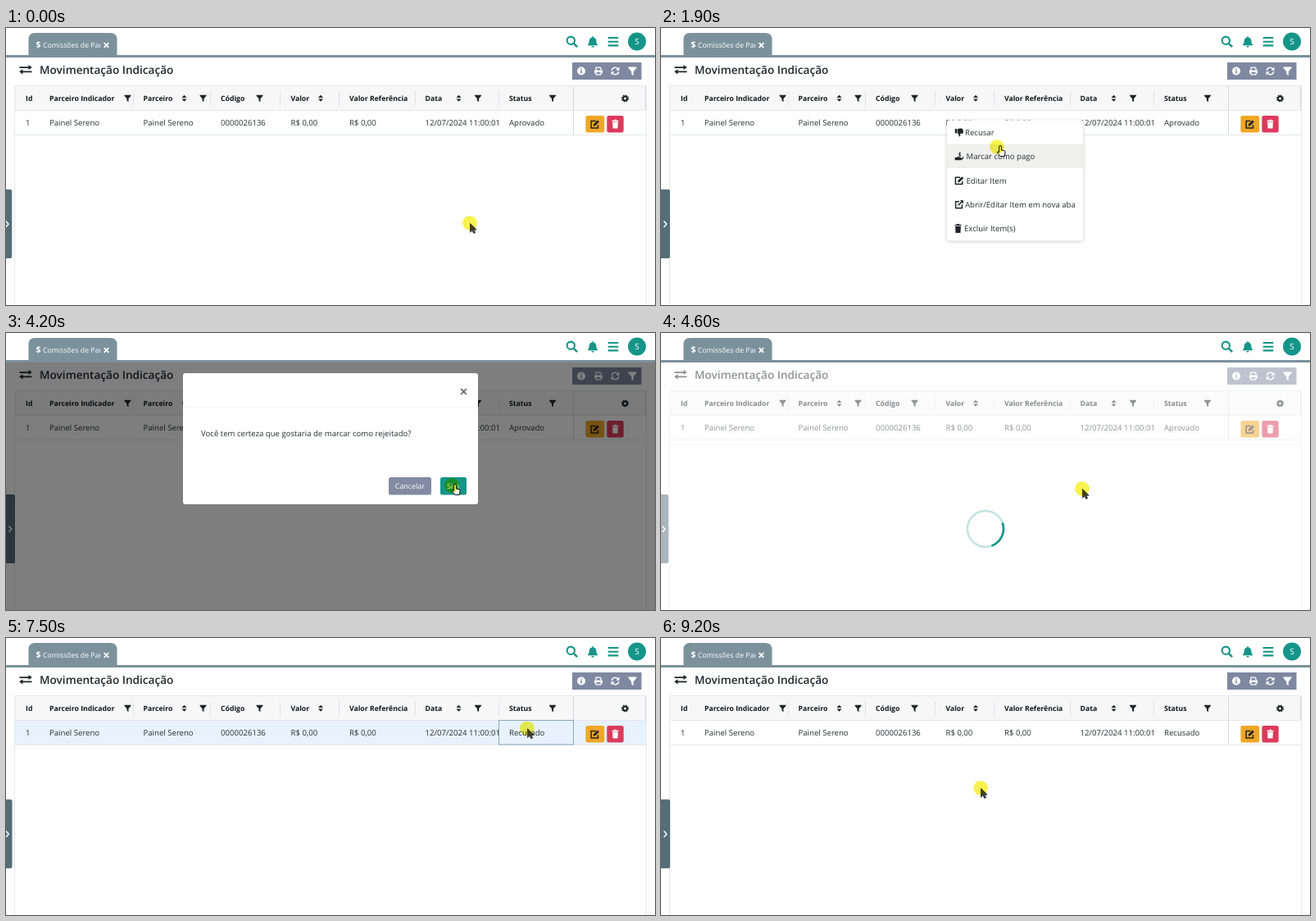
Recreate the animation shown at these times as an HTML page. Size 792x338 px, loop 9.4 s.

```html
<!DOCTYPE html>
<html lang="pt-BR">
<head>
<meta charset="utf-8">
<style>
html, body { margin: 0; width: 100%; height: 100%; overflow: hidden; background: #fff; }
svg { display: block; width: 792px; height: 338px; }
text { font: 9.6px "Open Sans", "Noto Sans", sans-serif; fill: #2b2f33; white-space: pre; text-rendering: geometricPrecision; }
.head { font-size: 8.7px; font-weight: 700; fill: #14171a; }
.title { font-size: 13.6px; font-weight: 600; fill: #22272e; }
.tab { font-size: 8.7px; fill: #fff; }
.btn { font-size: 8.9px; fill: #fff; }
.toast { font-size: 10.75px; fill: #555; }
.soft { filter: drop-shadow(0 1px 2px #0003); }
.float { filter: drop-shadow(0 0 4px #0002); }
</style>
</head>
<body>
<svg id="stage" viewBox="0 0 792 338"></svg>
<script>
const LOOP = 9400, STEP = 100;
const TEAL = '#159588', SLATE = '#7b929c', GREY = '#7e88a1', INK = '#202428';

// Icons are centred on the origin and painted with currentColor.
const line = (d, w = 1.5) => `<path d="${d}" fill="none" stroke="currentColor" stroke-width="${w}"/>`;
const solid = d => `<path d="${d}" fill="currentColor"/>`;
const icons = {
  filter: solid('M-4-4H4V-3L1 .6V4.6L-1 3V.6L-4-3Z'),
  sort: solid('M0-4L3-.8H-3ZM0 4L3 .8H-3Z'),
  gear: `<g fill="none" stroke="currentColor"><circle r="2.5" stroke-width="2"/>
    <circle r="3.8" stroke-width="1.5" stroke-dasharray="1.6 1.38"/></g>`,
  edit: line('M1-3.8H-4.6V4.6H3.8V1') + solid('M-2 2.4L-1.6 0L3.2-4.8L5.2-2.8L.4 2Z'),
  open: line('M0-3.6H-4.4V4.4H3.4V0') + line('M-1.4 1.2L4-4.2') + solid('M.8-5H5V-.8Z'),
  trash: solid('M-4-4.6H-1.5V-5.5H1.5V-4.6H4V-3.4H-4ZM-3.4-2.7H3.4L3 5.3H-3Z'),
  thumb: solid('M-5.2-4.5H-3V1H-5.2ZM-2.4-4Q0-5.2 3.4-4.6Q5-4 4.4-2.4Q5.6-1.4 4.8-.2Q5.4 1.4 3.8 1.4H1.2Q2 5-.2 5Q-.4 2-2.4.6Z'),
  pay: solid('M-5.4 1.2H-3.4Q-1.6-.4 0 1H2V2.2H-.6H2.4L4.8.6Q6 .8 5.2 2L2.4 4.6H-5.4Z') +
    line('M1.8-4Q-.9-4.4-.5-3Q0-2.2 1-2Q2.2-1.4 1.4-.6Q.6 0-.8-.6M.6-5.2V.4', .9),
  swap: line('M-7.5-2.6H4M7.5 2.6H-4', 1.7) + solid('M3.5-5.8L7.8-2.6L3.5.4ZM-3.5-.4L-7.8 2.6L-3.5 5.8Z'),
  print: solid('M-5-1H5V3H3.4V1.4H-3.4V3H-5Z') + line('M-3-1V-4.3H2L3-3.3V-1M-2.8 2V4.3H2.8V2', 1.3),
  refresh: line('M-4.2-.6A4.2 4.2 0 0 1 3.2-2.8M4.2 .6A4.2 4.2 0 0 1-3.2 2.8') +
    solid('M5-5V-.8H.8ZM-5 5V.8H-.8Z'),
  search: `<circle cx="-1.2" cy="-1.2" r="4.7" fill="none" stroke="currentColor" stroke-width="2.1"/>` + line('M2.2 2.2L6.6 6.6', 2.5),
  bell: solid('M-.8-6.8H.8V-5.6Q4.4-4.8 4.4-1Q4.4 2 6 3.3V4.3H-6V3.3Q-4.4 2-4.4-1Q-4.4-4.8-.8-5.6ZM-1.8 5H1.8Q1.4 6.8 0 6.8Q-1.4 6.8-1.8 5Z'),
  bars: line('M-6.3-4.7H6.3M-6.3 0H6.3M-6.3 4.7H6.3', 2.1),
  close: line('M-2.8-2.8L2.8 2.8M2.8-2.8L-2.8 2.8', 1.7)
};
const icon = (name, x, y, color = INK, size = 1) =>
  `<g transform="translate(${x} ${y}) scale(${size})" color="${color}">${icons[name]}</g>`;
const text = (x, y, s, cls = '', more = '') => `<text x="${x}" y="${y}" class="${cls}" ${more}>${s}</text>`;
const rect = (x, y, w, h, fill, more = '') =>
  `<rect x="${x}" y="${y}" width="${w}" height="${h}" fill="${fill}" ${more}/>`;

const columns = [
  [24, 'Id', '1'], [53, 'Parceiro Indicador', 'Painel Sereno'], [167.5, 'Parceiro', 'Painel Sereno'],
  [262, 'Código', '0000026136'], [347.5, 'Valor', 'R$ 0,00'], [419, 'Valor Referência', 'R$ 0,00'],
  [511.5, 'Data', '12/07/2024 11:00:01'], [614, 'Status', 'Aprovado']
];
const menuItems = [
  ['thumb', 'Recusar', 371], ['pay', 'Marcar como pago', 372.5], ['edit', 'Editar Item', 372.5],
  ['open', 'Abrir/Editar Item em nova aba', 371], ['trash', 'Excluir Item(s)', 370]
];
const MENU_TOP = 112.5, ITEM = 29.3;

const page = `
  ${rect(0, 36, 792, 302, '#fefefe')}
  ${icon('swap', 24, 50.7)}
  ${text(41, 56, 'Movimentação Indicação', 'title')}
  ${rect(691, 42, 84.5, 21, GREY)}
  <circle cx="702" cy="52.5" r="5" fill="#fff"/>
  ${line('M702 49.2V50.6M702 51.6V55.6', 1.6).replace('currentColor', GREY)}
  ${icon('print', 723, 52.5, '#fff')}${icon('refresh', 743.5, 52.5, '#fff')}${icon('filter', 764.5, 52.5, '#fff', 1.25)}
  ${rect(11, 71, 770, 29, '#f7f7f8')}
  <g id="hover">${rect(11, 100, 770, 30, '#e7f2fc')}</g>
  <path d="M10.5 338V70.5H781.5V338M11 100.5H781M11 130.5H781" fill="none" stroke="#e6e8ea"/>
  <path d="M155.5 77V95M249.5 77V95M334.5 77V95M406.5 77V95M499.5 77V95M601.5 77V95" stroke="#e2e3e5"/>
  <path d="M692.5 71V130M780.5 71V100" stroke="#d6d9dc"/>
  ${columns.map(([x, head, cell]) => text(x, 89.3, head, 'head') +
    text(x, 119.2, cell, '', head == 'Status' ? 'id="status"' : '')).join('')}
  ${[148.5, 240.5, 309.5, 576, 667].map(x => icon('filter', x, 85.7)).join('')}
  ${[217.5, 384, 552.5].map(x => icon('sort', x, 85.7)).join('')}
  ${icon('gear', 755.5, 86)}
  ${rect(707.4, 107, 22.8, 20.4, '#f0a726', 'rx="2.5"')}${icon('edit', 718.7, 117.3)}
  ${rect(733.3, 107, 20.4, 20.4, '#dc3b5b', 'rx="2.5"')}${icon('trash', 743.5, 117.3, '#fff')}
  <rect id="cell" x="601.5" y="100.5" width="91" height="29.5" fill="none" stroke="#8ba6bb"/>
  <g id="handle"><path d="M-12 197H-2Q0 197 0 199V279Q0 281-2 281H-12Z" fill="#546d78"/>
    <path d="M-7.6 235.6L-4.2 239.3L-7.6 243" fill="none" stroke="#fff" stroke-width="1.5"/></g>`;

const topBar = `
  ${rect(0, 0, 792, 33, '#fff')}${rect(0, 33, 792, 3, SLATE)}
  <path d="M27.5 33V14Q27.5 6 35.5 6H127Q135.5 6 135.5 14V33Z" fill="${SLATE}"/>
  ${text(36.5, 24, '$', 'tab', 'style="font-size:10.5px;font-weight:700"')}
  <clipPath id="tabClip">${rect(40, 6, 75, 27, '#000')}</clipPath>
  <g clip-path="url(#tabClip)">${text(45, 23.5, 'Comissões de Parceiros', 'tab')}</g>
  ${icon('close', 122.5, 21, '#fff')}
  ${icon('search', 690.5, 16.5, TEAL)}${icon('bell', 716, 17, TEAL)}${icon('bars', 741, 16.7, TEAL)}
  <circle cx="770" cy="16.5" r="11" fill="${TEAL}"/>
  ${text(770, 20.3, 'S', 'btn', 'text-anchor="middle" style="font-size:10px"')}`;

const menu = `
  ${rect(349, MENU_TOP, 166, 147, '#fff', 'rx="2" class="soft"')}
  <rect id="pick" x="349" width="166" height="${ITEM}" fill="#f0f0ef"/>
  ${menuItems.map(([name, label, x], i) => {
    const y = 127.4 + i * ITEM;
    return icon(name, name == 'trash' ? 362.5 : 364, y) + text(x, y + 3.5, label);
  }).join('')}`;

const dialog = `
  ${rect(216, 49, 360, 160, '#fff', 'rx="3"')}
  <path d="M216 90.5H576" stroke="#f8f8f9"/>
  ${icon('close', 558.5, 71.5, '#6f7378', 1.2)}
  ${text(238, 126, 'Você tem certeza que gostaria de marcar como rejeitado?')}
  ${rect(467, 176, 52, 21.5, '#828ba3', 'rx="2.5"')}${text(492.8, 190.3, 'Cancelar', 'btn', 'text-anchor="middle"')}
  ${rect(530, 176, 32, 21.5, TEAL, 'rx="2.5"')}${text(545.7, 190.3, 'Sim', 'btn', 'text-anchor="middle"')}`;

const toast = `
  ${rect(8, 8, 245, 77.5, '#fff', 'rx="3" class="float"')}
  <circle cx="36" cy="46" r="13.3" fill="none" stroke="#e6f2e0" stroke-width="2.6"/>
  <path d="M28.5 46.5L34 51.7L43.8 41.7" fill="none" stroke="#a3d67c" stroke-width="3.2"/>
  ${text(68, 46.7, 'Marcado como', 'toast')}${text(68, 61.7, 'recusado/rejeitado', 'toast')}`;

// The highlight lies over the pointer and tints it.
const pointer = `
  <path id="arrow" d="M.5 .5V11.3L3 9L4.7 12.6L6.7 11.7L5 8.2H8.2Z" fill="#444" stroke="#222" stroke-width=".7"/>
  <path id="hand" d="M4-1.5Q5.4-1.5 5.4 0V4L9 4.8Q10.3 5.2 10 7L9.2 11.5H3.8L.4 7Q.2 5.6 1.6 6L2.6 7V0Q2.6-1.5 4-1.5Z" fill="#fff" stroke="#111"/>
  <circle r="8.8" fill="#f9f34e" style="mix-blend-mode:multiply"/>`;

const stage = document.getElementById('stage');
stage.innerHTML = `${page}
  <g id="shade">${rect(0, 36, 792, 302, '#000', 'opacity=".5"')}</g>
  <g id="load">${rect(0, 36, 792, 302, '#fff', 'opacity=".5"')}
    <circle cx="396" cy="239" r="22" fill="none" stroke="${TEAL}" stroke-opacity=".25" stroke-width="2.6"/>
    <path id="arc" d="M22 0A22 22 0 0 1 0 22" fill="none" stroke="${TEAL}" stroke-width="2.6"/></g>
  ${topBar}
  <g id="menu">${menu}</g><g id="dialog">${dialog}</g><g id="toast">${toast}</g>
  <g id="pointer">${pointer}</g>`;

const $ = id => document.getElementById(id);
const set = (id, name, value) => $(id).setAttribute(name, value);
const fade = (id, value) => set(id, 'opacity', value);
const clamp = v => Math.max(0, Math.min(1, v));
const ease = v => v * v * (3 - 2 * v);
const during = (t, from, to) => t >= from && t < to;
// Rises over `inTime` after `from`, falls over `outTime` after `to`.
const pulse = (t, from, to, inTime, outTime) => Math.min(clamp((t - from) / inTime), 1 - clamp((t - to) / outTime));

// Pointer stops: time, x, y
const path = [
  [0, 566, 238], [1000, 352, 115], [1300, 352, 115], [1900, 410, 145], [2000, 411, 137], [2300, 410, 131],
  [3000, 410, 131], [4000, 544, 186], [4200, 544, 186], [4600, 514, 190], [5100, 496, 186], [6300, 470, 177],
  [7300, 636, 110], [8000, 636, 111], [9000, 390, 183], [LOOP, 390, 183]
];
function pointerAt(t) {
  const i = path.findIndex(p => p[0] > t);
  const [t0, x0, y0] = path[i - 1], [t1, x1, y1] = path[i];
  const k = ease((t - t0) / (t1 - t0));
  return [x0 + (x1 - x0) * k, y0 + (y1 - y0) * k];
}

function draw(t) {
  const [x, y] = pointerAt(t);
  const menuOpen = during(t, 1300, 2500), modal = pulse(t, 2400, 4200, 200, 200);
  const loading = pulse(t, 4300, 5400, 200, 200);
  const hand = (menuOpen && x > 355) || (during(t, 3100, 4300) && x > 530 && y > 176);

  set('pointer', 'transform', `translate(${x} ${y})`);
  fade('hand', +hand);
  fade('arrow', +!hand);
  fade('hover', +(y > 100 && y < 130 && !menuOpen && !modal && !loading));
  fade('cell', +during(t, 7300, 8400));
  fade('menu', +menuOpen);
  set('pick', 'y', MENU_TOP + ITEM * Math.floor(Math.max(0, y - MENU_TOP) / ITEM));
  fade('shade', modal);
  fade('dialog', modal);
  set('dialog', 'transform', `translate(0 ${-12 * (1 - ease(modal))})`);
  fade('load', loading);
  set('arc', 'transform', `translate(396 239) rotate(${(t - 4600) * 0.36 - 20})`);
  fade('toast', pulse(t, 5500, 6900, 200, 300));
  $('status').textContent = t < 5400 ? 'Aprovado' : 'Recusado';
  const width = 9.2 + 2 * Math.cos((t - 9250) / 1240 * 2 * Math.PI);
  set('handle', 'transform', `translate(${width} 0)`);
}

function tick() {
  const t = Math.floor(performance.now() % LOOP / STEP) * STEP;
  draw(Math.min(t, 9200));
  requestAnimationFrame(tick);
}
tick();
</script>
</body>
</html>
```
